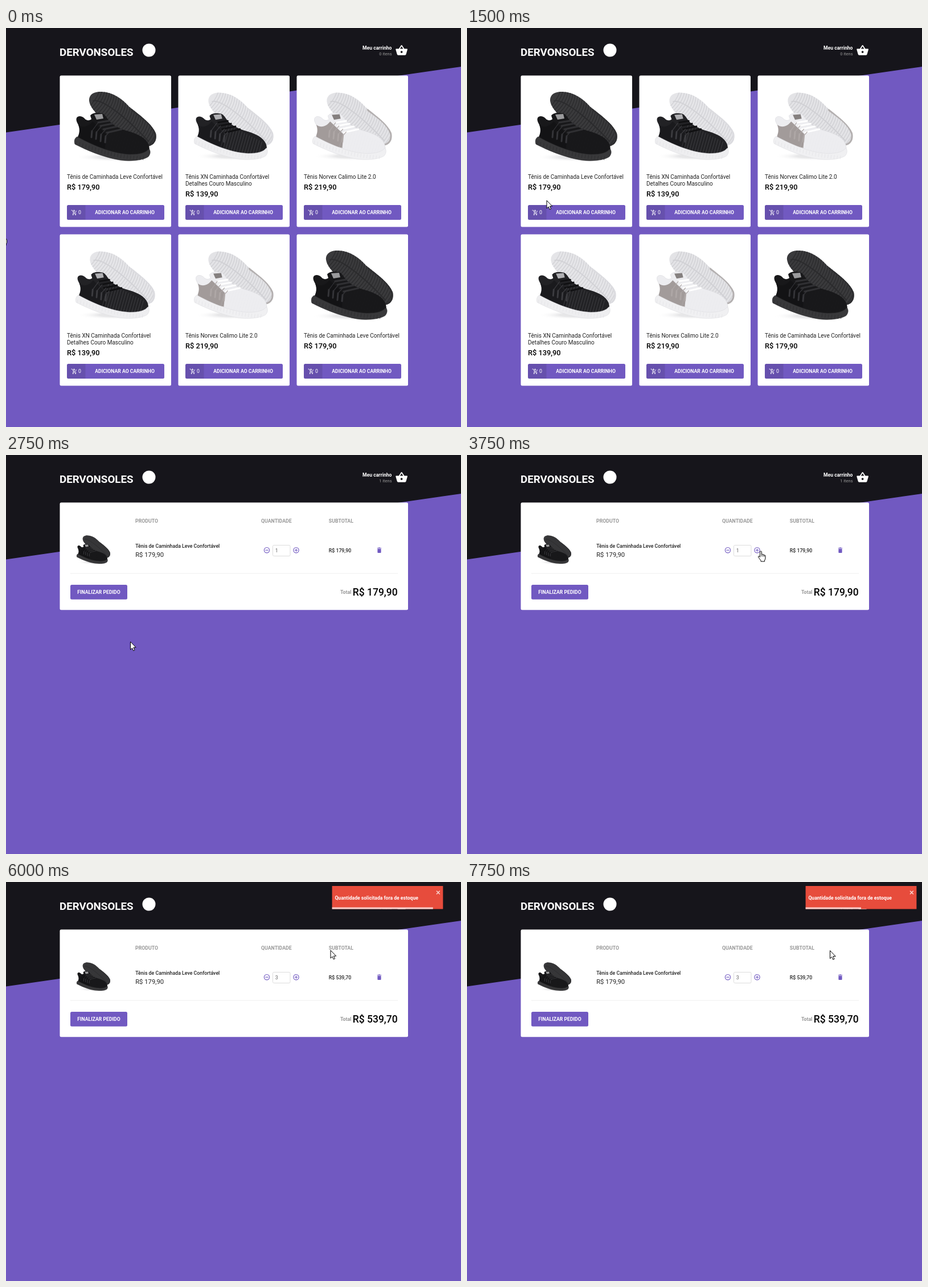
Write an HTML page that moves like this. It is 799 by 701 pixels and loops after 8 s.

```html
<!DOCTYPE html>
<html lang="pt-BR">
<head>
<meta charset="utf-8">
<title>Loja</title>
<style>
  html, body { margin: 0; width: 100%; height: 100%; overflow: hidden; background: #7159c1; }
  svg { display: block; width: 799px; height: 701px; }
  text { font-family: Roboto, "Open Sans", sans-serif; font-size: 8.75px; fill: #222; }
  .bold { font-weight: 700; }
  .mid { font-weight: 500; }
  .white { fill: #fff; }
  .grey { fill: #999; }
  .end { text-anchor: end; }
  .center { text-anchor: middle; }
  .line { fill: none; stroke-linecap: round; stroke-linejoin: round; }
</style>
</head>
<body>
<script>
const STEP = 250, LOOP = 8000;
const PURPLE = '#7159c1', HOVER = '#5e42b0';

const text = (x, y, s, cls = '', size = 8.75, fill = '') =>
  `<text x="${x}" y="${y}" class="${cls}" style="font-size:${size}px;${fill && 'fill:' + fill}">${s}</text>`;
const box = (x, y, w, h, fill, r = 2.5, extra = '') =>
  `<rect x="${x}" y="${y}" width="${w}" height="${h}" rx="${r}" fill="${fill}" ${extra}/>`;
const shape = (d, fill, extra = '') => `<path d="${d}" fill="${fill}" ${extra}/>`;
const line = (d, color, width, extra = '') =>
  `<path class="line" d="${d}" stroke="${color}" stroke-width="${width}" ${extra}/>`;
const group = (x, y, body) => `<g transform="translate(${x} ${y})">${body}</g>`;

// Shoe drawn in the coordinates of the first card
const SOLE = 'M146 128C145 116 156 111 168 112C188 113 204 124 216 138C230 150 256 167 263 185C266 198 259 208 246 208C224 205 195 186 178 169C162 153 148 142 146 128Z';
const UPPER = 'M124 158C127 153 134 155 138 159C141 163 147 163 150 160L148 154C151 149 160 148 168 150C174 151 176 157 181 163C187 170 198 176 210 180C229 185 245 192 250 204C253 212 252 218 249 221C235 225 215 224 190 220C165 212 140 205 126 198C123 190 133 186 128 173C126 167 122 163 124 158Z';
const HEEL = 'M127 170C136 177 146 172 152 164L176 187L174 212C155 208 139 200 127 196C125 189 132 184 127 170Z';
const MID = 'M125 191C121 193 119 198 121 204C140 214 170 227 200 232C220 235 242 232 250 226C254 221 254 216 251 212C246 219 235 222 218 222C190 221 158 209 125 191Z';

const TONES = {
  dark: { sole: '#3a3a3c', groove: '#2b2b2d', upper: '#18181a', heel: '#131315', mid: '#38383a', edge: '#262628', lace: '#303033', strap: '#343438', tag: '#9a9a9c', side: '#2e2e30' },
  mixed: { sole: '#e5e5e8', groove: '#d2d2d6', upper: '#222225', heel: '#1a1a1d', mid: '#eeeef0', edge: '#dcdce0', lace: '#101012', strap: '#3c3c40', tag: '#b0b0b3', side: '#dcdce0' },
  light: { sole: '#e3e3e6', groove: '#d0d0d4', upper: '#ededf0', heel: '#a29b9a', mid: '#f0f0f2', edge: '#dcdce0', lace: '#ffffff', strap: '#aea7a6', tag: '#85807f', side: '#b4b0b0' }
};

const repeat = (n, f) => Array.from({ length: n }, (_, i) => f(i)).join('');
const grooves = repeat(30, i => `M${166 + i * 4} ${100 + i * 2.9}q-2 26 -32 48`);
const sidewall = repeat(22, i => `M${124 + i * 5.6} ${199 + 27 * Math.sin(i / 14)}l-1 6`);
const knit = repeat(15, i => `M${180 + i * 4.5} ${170 + i * 2.2}l-12 42`);

function shoe(kind) {
  const c = TONES[kind];
  const fit = kind === 'dark' ? '' : 'transform="translate(5.8 5.1) scale(.97)"';
  return `<g ${fit}>
    <ellipse cx="190" cy="227" rx="68" ry="8" fill="url(#shade)" opacity=".45"/>
    ${shape(SOLE, c.sole)}
    <g clip-path="url(#soleClip)">${line(grooves, c.groove, 1.4)}
      ${line('M222 143C240 156 257 168 263 185C266 198 259 208 246 208', c.side, 6)}
      ${line('M153 128C166 124 205 150 250 199', c.groove, 2)}</g>
    ${shape(UPPER, c.upper, kind === 'light' ? 'stroke="#dedee2" stroke-width=".8"' : '')}
    ${shape(HEEL, c.heel)}
    <g clip-path="url(#upperClip)">${line(knit, c.edge, .6, 'opacity=".25"')}</g>
    ${shape('M126 158Q132 156 137 162Q143 166 150 162L146 169Q136 174 128 170Z', c.upper)}
    ${shape(MID, c.mid, `stroke="${c.edge}" stroke-width=".6"`)}
    ${line(sidewall, c.edge, .9, 'opacity=".6"')}
    ${shape('M155 152L169 151L171 159L159 161Z', c.tag)}
    ${line('M162 166L181 163M166 172L187 168M171 178L195 173M177 184L203 178', c.lace, 3)}
    ${line('M151 181l-1 11M159 183l-1 12M167 187l-1 12M175 190l-1 11', c.strap, 3)}
    ${line('M151 181l11 -15M159 183l9 -11M167 187l8 -9M175 190l6 -7', c.strap, 1.2)}
  </g>`;
}

const ITEMS = {
  dark: { name: ['Tênis de Caminhada Leve Confortável'], price: 'R$ 179,90' },
  mixed: { name: ['Tênis XN Caminhada Confortável', 'Detalhes Couro Masculino'], price: 'R$ 139,90' },
  light: { name: ['Tênis Norvex Calimo Lite 2.0'], price: 'R$ 219,90' }
};

const addIcon = group(114.5, 319,
  line('M.4 1.2H1.8L4 5.6H7.2L9 2.4M4 5.6L2.9 7.2H8.4M5 .6V4M3.4 2.3H6.6', '#fff', .85) +
  '<circle cx="3.2" cy="9" r=".9" fill="#fff"/><circle cx="7.6" cy="9" r=".9" fill="#fff"/>');

function card(kind, i) {
  const { name, price } = ITEMS[kind];
  const extra = (name.length - 1) * 12.5;
  return group(i % 3 * 208, Math.floor(i / 3) * 279,
    box(94.5, 83.5, 195.5, 266, '#fff') + shoe(kind) +
    name.map((s, n) => text(107, 264.7 + n * 12.5, s, '', 10)).join('') +
    text(107, 283.6 + extra, price, 'mid', 12.8, '#000') +
    box(107, 311, 171, 26, PURPLE, 2.5, i ? '' : 'id="buy"') +
    shape('M109.5 311H139.5V337H109.5Q107 337 107 334.5V313.5Q107 311 109.5 311Z', '#000', 'opacity=".1"') +
    addIcon + text(127, 327.4, '0', 'white') +
    text(208.6, 327.4, 'ADICIONAR AO CARRINHO', 'bold white center', 8.65));
}

const home = ['dark', 'mixed', 'light', 'mixed', 'light', 'dark'].map(card).join('');

const ring = (x, d) => `<circle cx="${x}" cy="167.2" r="4.7" fill="none" stroke="${PURPLE}" stroke-width="1.1"/>` +
  `<path d="${d}" stroke="${PURPLE}" stroke-width="1.1"/>`;
const cart = box(94.5, 83.5, 611.5, 188.8, '#fff') +
  text(227, 118.8, 'PRODUTO', 'bold grey') + text(448, 118.8, 'QUANTIDADE', 'bold grey') +
  text(566.8, 118.8, 'SUBTOTAL', 'bold grey') +
  `<g transform="translate(74.8 95.5) scale(.41)">${shoe('dark')}</g>` +
  text(227.2, 162.6, ITEMS.dark.name[0], 'mid') + text(227.2, 179, ITEMS.dark.price, '', 11.25) +
  ring(458, 'M455.2 167.2h5.6') + ring(509.5, 'M506.7 167.2h5.6M509.5 164.4v5.6') +
  box(468.5, 158.5, 30.5, 19, '#fff', 2, 'stroke="#ddd"') +
  '<text id="qty" x="472.8" y="171.2" style="fill:#666"></text>' +
  '<text id="sub" x="566.8" y="171" class="mid"></text>' +
  shape('M652.4 164.9h6.2v6.2q0 1-1 1h-4.2q-1 0-1-1zM651.8 163.2h1.8l.6-.6h2.6l.6.6h1.8v1h-7.4z', PURPLE) +
  box(113, 207.6, 575, 1, '#eee', 0) +
  box(113, 228, 100, 25.8, PURPLE) + text(163, 244, 'FINALIZAR PEDIDO', 'bold white center', 8.65) +
  text(587, 243.8, 'Total', 'bold grey') +
  '<text id="total" x="687.6" y="247" class="mid end" style="font-size:17.5px;fill:#000"></text>';

const basket = group(683.4, 28, shape('M17.2 9L12.8 2.4Q12 1.6 11.2 2.4L6.8 9H2Q.9 9.1 1 10.3L3.6 19.5Q4 21 5.5 21H18.5Q20 21 20.4 19.5L23 10.3Q23.1 9.1 22 9ZM9 9L12 4.6L15 9ZM12 17A2 2 0 1 1 12 13A2 2 0 1 1 12 17Z',
  '#fff', 'fill-rule="evenodd" transform="scale(.9375)"'));

const toast = box(594.6, 7, 194.8, 40.6, '#e74c3c', .6) +
  text(599.4, 30.6, 'Quantidade solicitada fora de estoque', 'bold white', 8.6) +
  line('M778.4 16l5 5M783.4 16l-5 5', '#fff', 1.6, 'opacity=".75"') +
  box(594.6, 44.5, 0, 3.1, '#fff', 0, 'id="bar" opacity=".72"');

const arrow = shape('M0 0V14L3.1 11.1L5.2 15.8L7.5 14.8L5.4 10.1H9.7Z', '#fff', 'stroke="#000" stroke-width="1"');
const hand = shape('M3.6 1.8Q5 -.2 6.4 1.8V6.6Q8 5.6 8.9 7.2Q10.4 6.4 11.2 8Q13 7.4 13 9.6V13Q13 15 11.6 17V19H5V17.4Q2.6 14.6 .6 11.2Q.2 9.4 2.2 9.8L3.6 11.2Z',
  '#fff', 'stroke="#000" stroke-width="1"') + line('M6.4 7v3M8.9 7.6v2.6M11.2 8.4v2', '#000', .8);

document.body.innerHTML = `<svg viewBox="0 0 799 701">
  <defs>
    <clipPath id="soleClip"><path d="${SOLE}"/></clipPath>
    <clipPath id="upperClip"><path d="${UPPER}"/></clipPath>
    <radialGradient id="shade"><stop offset=".4" stop-color="#c9c9cc"/><stop offset="1" stop-color="#fff" stop-opacity="0"/></radialGradient>
  </defs>
  <rect width="799" height="701" fill="${PURPLE}"/>
  <path d="M0 0H799V68L0 183.5Z" fill="#16151b"/>
  ${text(94, 49.2, 'DERVONSOLES', 'bold white', 18.75)}
  <circle cx="251" cy="39" r="11.5" fill="#fff"/>
  ${text(677.5, 37.8, 'Meu carrinho', 'bold white end', 8.65)}
  <text id="count" x="677.5" y="48.4" class="grey end" style="font-size:7.5px"></text>
  ${basket}
  <g id="home">${home}</g><g id="cart">${cart}</g>
  <g id="toast">${toast}</g>
  <g id="arrow">${arrow}</g><g id="hand">${hand}</g>
</svg>`;

// step, x, y, pointing hand
const PATH = [
  [0, -11.5, 363, 1], [1, 100, 352], [2, 225, 364], [3, 322.5, 375.5], [4, 402, 372], [5, 276, 358],
  [6, 140, 303], [7, 196, 322, 1], [8, 218, 327.5, 1], [11, 218.5, 328],
  [12, 290, 290], [13, 390, 235], [14, 470, 190], [15, 511, 168, 1], [16, 514.6, 169, 1],
  [24, 570, 120], [25, 655, 45], [26, 721.5, -3.5], [27, 705, 35], [28, 665, 92],
  [29, 645, 113], [30, 638, 120], [31, 637.5, 120.5]
];

const el = id => document.getElementById(id);
const show = (id, on) => el(id).style.display = on ? '' : 'none';
const move = (id, x, y) => el(id).setAttribute('transform', `translate(${x} ${y})`);
let last = -1;

function draw(step) {
  const inCart = step >= 11;
  const qty = step < 17 ? 1 : step < 18 ? 2 : 3;
  const sum = 'R$ ' + (179.9 * qty).toFixed(2).replace('.', ',');
  show('home', !inCart);
  show('cart', inCart);
  el('count').textContent = `${inCart ? 1 : 0} itens`;
  el('qty').textContent = qty;
  el('sub').textContent = el('total').textContent = sum;
  el('buy').setAttribute('fill', step >= 7 ? HOVER : PURPLE);

  show('toast', step >= 24);
  move('toast', step === 24 ? -22 : step === 25 ? -5 : 0, 0);
  el('bar').setAttribute('width', Math.max(0, 154.4 - (step - 26) * 11.4));

  const [, x, y, pointing] = PATH.filter(p => p[0] <= step).pop();
  show('arrow', !pointing);
  show('hand', pointing);
  move(pointing ? 'hand' : 'arrow', x, y);
}

function tick() {
  const step = Math.floor(performance.now() % LOOP / STEP);
  if (step !== last) draw(last = step);
  requestAnimationFrame(tick);
}
tick();
</script>
</body>
</html>
```
